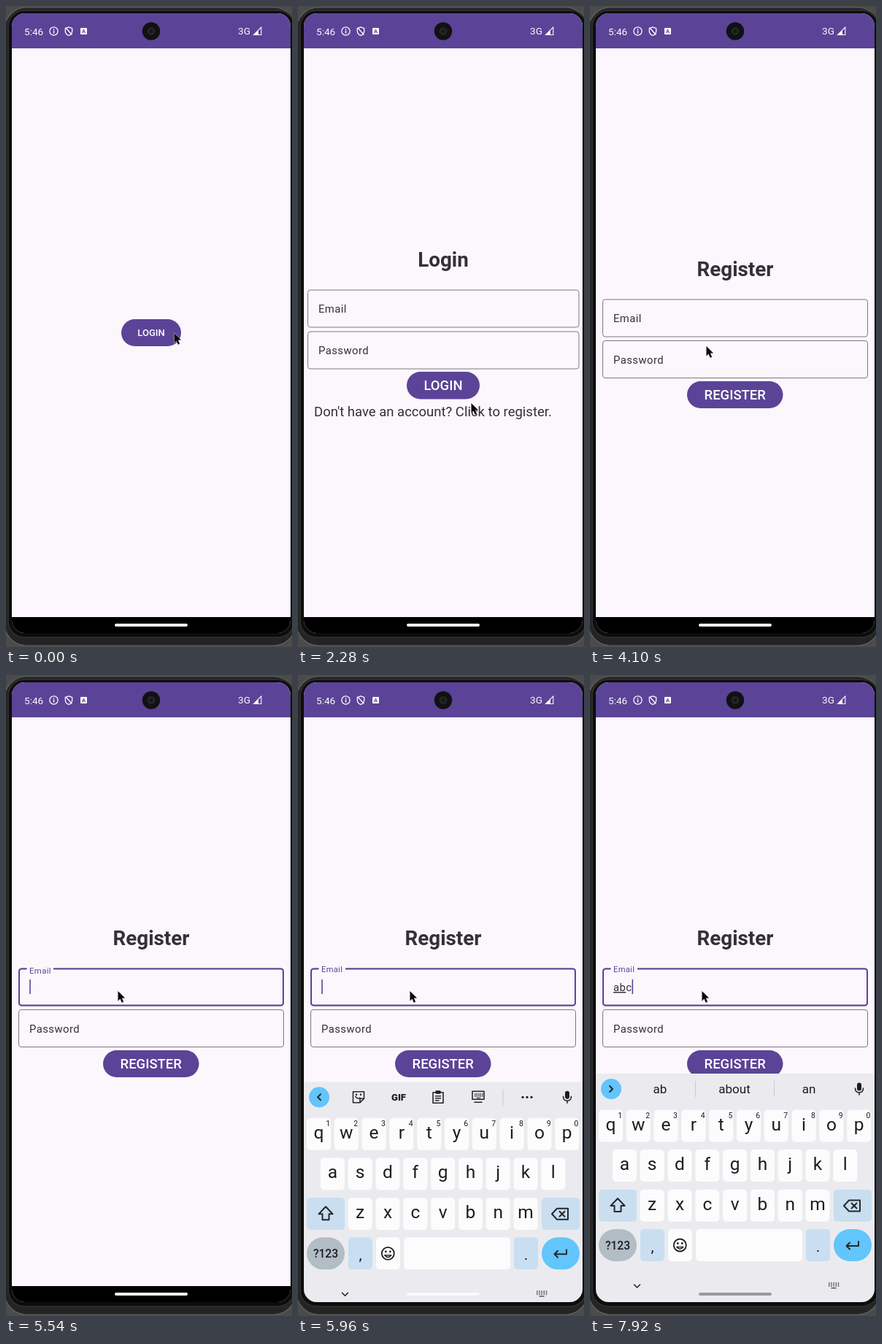
These frames come from a looping animation (392x878 px, 8 s). An HTML page:

```html
<!DOCTYPE html>
<html lang="en">
<head>
<meta charset="utf-8">
<title>Login and register</title>
<style>
  html, body { margin: 0; width: 100%; height: 100%; overflow: hidden; background: #0c0c0c; }
  svg { display: block; width: 100%; height: 100%; font-family: Roboto, sans-serif; }
  .line { fill: none; stroke: #26272b; stroke-width: 1.6; stroke-linejoin: round; stroke-linecap: round; }
</style>
</head>
<body>
<svg id="stage" viewBox="0 0 392 878"></svg>
<script>
const LOOP = 8000;
const PAPER = '#fcf7fc', PURPLE = '#5b4497', INK = '#323139', KEY_INK = '#1c1d20';
const BOARD = '#ebebef', KEY = '#fcfcfd', GREY_KEY = '#c9def1', BLUE = '#62c5fb';
const BOARD_TOP = 546, BOARD_HEIGHT = 313;

const rect = (x, y, w, h, fill, r = 0, extra = '') =>
  `<rect x="${x}" y="${y}" width="${w}" height="${h}" rx="${r}" fill="${fill}" ${extra}/>`;
const circle = (x, y, r, fill, extra = '') =>
  `<circle cx="${x}" cy="${y}" r="${r}" fill="${fill}" ${extra}/>`;
const text = (x, y, size, str, fill = INK, extra = '') =>
  `<text x="${x}" y="${y}" font-size="${size}" fill="${fill}" ${extra}>${str}</text>`;
const line = (d, extra = '') => `<path class="line" d="${d}" ${extra}/>`;
const group = (id, body, extra = '') => `<g id="${id}" ${extra}>${body}</g>`;
const at = (x, y, body) => `<g transform="translate(${x} ${y})">${body}</g>`;
const MID = 'text-anchor="middle"';

const button = (x, y, w, h, size, label) =>
  rect(x, y, w, h, PURPLE, h / 2) +
  text(x + w / 2, y + h / 2 + size * 0.355, size, label, '#fff', MID + ' font-weight="500"');
const title = (y, str) => text(199, y, 27.8, str, INK, MID + ' font-weight="700"');
const box = (x, y, w) => rect(x, y, w, 51, 'none', 3.5, 'stroke="#7c7784"');
const fieldText = (x, y, str) => text(x, y, 14.8, str, INK, 'letter-spacing=".46"');

function statusBar() {
  const white = '#fafafc';
  return rect(8, 10, 382, 48, PURPLE) +
    text(25, 39.5, 13.6, '5:46', white) +
    circle(65.5, 34.5, 5.6, 'none', `stroke="${white}" stroke-width="1.3"`) +
    rect(64.8, 33.6, 1.5, 4, white) + rect(64.8, 31.2, 1.5, 1.5, white) +
    line('M86 28.8L90.7 30.6V34.5Q90.5 38.7 86 40.4Q81.5 38.7 81.3 34.5V30.6ZM82 30L90 39',
      `style="stroke:${white};stroke-width:1.3"`) +
    rect(102, 30, 9, 9, white, 1) +
    text(106.5, 37.2, 7.5, 'A', PURPLE, MID + ' font-weight="700"') +
    circle(199, 34.5, 12.2, '#111113') + circle(199, 34.5, 5.5, '#242427') +
    circle(199, 34.5, 2.2, '#151517') +
    text(318, 39.3, 13.6, '3G', white) +
    `<path d="M339.5 39.5H349.8V29.2Z" fill="none" stroke="${white}" stroke-width="1.1"/>` +
    `<path d="M339 40H346V33Z" fill="${white}"/>`;
}

function letterRow(letters, firstCenter, y, digits) {
  return [...letters].map((letter, i) => {
    const x = firstCenter + 37.8 * i;
    return rect(x - 16.5, y, 33, 44, KEY, 5) +
      text(x, y + 28, 24.5, letter, KEY_INK, MID) +
      (digits ? text(x + 12.8, y + 11.5, 10.5, (i + 1) % 10, KEY_INK, MID) : '');
  }).join('');
}

const miniKeyboard = (w, h) =>
  [0, 1, 2].map(r => [0, 1, 2, 3, 4].map(c =>
    rect(-w / 2 + c * w / 4.4, -h / 2 + r * h / 2.8, 1.5, 1.5, '#4a4b50')).join('')).join('') +
  rect(-w / 4, h / 2 + 1, w / 2, 1.4, '#4a4b50');

function keyboard() {
  const bold = d => line(d, 'style="stroke-width:2"');
  const divider = x => rect(x, 10, 1, 22, '#c8c7d2');
  const mic = rect(-3, -8.5, 6, 11, KEY_INK, 3) + line('M-5.5 -1Q-5.5 5 0 5T5.5 -1M0 5V8');
  const sticker = line('M-7.5 -7.5H7.5V2L2 7.5H-7.5ZM7.5 2H2V7.5M-4 -1Q-2 3 2 1') +
    circle(-3, -3.5, 1.2, KEY_INK) + circle(3, -3.5, 1.2, KEY_INK);
  const clipboard = line('M-7 -6.5H7V8H-7ZM-3.5 -1.5H3.5M-3.5 1.5H3.5M-3.5 4.5H1') +
    rect(-3.5, -9, 7, 4.5, KEY_INK, 1);
  const tools = group('tools', bold('M31 17L27 21L31 25') +
    at(83, 21, sticker) +
    text(138, 25.4, 13, 'GIF', KEY_INK, MID + ' font-weight="900"') +
    at(192, 21, clipboard) +
    at(247, 20, line('M-8 -7H8V4H-8ZM-5 8H5') + at(0.5, -2, miniKeyboard(11, 5))) +
    divider(280.5) + [308, 314, 320].map(x => circle(x, 21, 1.6, KEY_INK)).join(''));
  const words = group('words', bold('M27 17L31 21L27 25') + divider(144) + divider(252) +
    [96, 198, 300].map(x => text(x, 27, 17, '', KEY_INK, MID + ' class="word"')).join(''));

  return rect(8, 0, 382, 340, BOARD) + circle(29, 21, 14, BLUE) + tools + words + at(369, 21, mic) +
    letterRow('qwertyuiop', 28.5, 49.5, true) +
    letterRow('asdfghjkl', 47.4, 104, false) +
    letterRow('zxcvbnm', 85.2, 158.7, false) +
    rect(12, 158.7, 52, 44, GREY_KEY, 5) + rect(334, 158.7, 52, 44, GREY_KEY, 5) +
    bold('M38 171L28.5 181H33.5V189H42.5V181H47.5Z') +
    bold('M355 173.5H370V188.5H355L348 181ZM358.5 177.5L365.5 184.5M365.5 177.5L358.5 184.5') +
    rect(12, 213, 52, 44, '#b2bdc6', 22) + rect(334, 213, 52, 44, BLUE, 22) +
    text(38, 240.5, 15.6, '?123', KEY_INK, MID + ' font-weight="500"') +
    rect(69, 213, 33, 44, GREY_KEY, 5) + text(85.5, 244, 21, ',', KEY_INK, MID) +
    rect(107, 213, 33, 44, KEY, 5) +
    at(123.3, 235, line('M-4.5 2.5Q0 8 4.5 2.5Z') +
      circle(0, 0, 8.5, 'none', `stroke="${KEY_INK}" stroke-width="1.8"`) +
      circle(-3, -2.5, 1.4, KEY_INK) + circle(3, -2.5, 1.4, KEY_INK)) +
    rect(145, 213, 146, 44, KEY, 5) +
    rect(296, 213, 33, 44, GREY_KEY, 5) + text(312.5, 244, 21, '.', KEY_INK, MID) +
    bold('M368 230V236H352M356 231.5L351.5 236L356 240.5') +
    line('M60.5 289L64.5 293L68.5 289') + at(334, 289, miniKeyboard(14, 6));
}

const home = group('home', button(158, 429, 82, 37, 13, 'LOGIN'));

const login = group('login', title(357, 'Login') +
  box(13.5, 389, 371.5) + fieldText(28, 420, 'Email') +
  box(13.5, 446, 371.5) + fieldText(28, 477, 'Password') +
  button(149, 501, 100, 37.5, 18.5, 'LOGIN') +
  text(22, 562, 18.5, "Don't have an account? Click to register."));

const register = group('register', title(370, 'Register') +
  box(17.5, 402, 363) +
  group('focus', rect(18, 402.5, 362, 50, 'none', 3.5, `stroke="${PURPLE}" stroke-width="2"`) +
    rect(28.5, 400, 36.5, 5, PAPER)) +
  group('label', fieldText(0, 0, 'Email')) +
  text(32, 433, 14.8, '<tspan id="settled" text-decoration="underline"></tspan><tspan id="fresh"></tspan>',
    INK, 'id="typed" letter-spacing=".46"') +
  rect(0, 417, 1.6, 20, PURPLE, 0, 'id="caret"') +
  box(17.5, 458.5, 363) + fieldText(32, 489.5, 'Password') +
  button(133, 514, 131.5, 37, 18.5, 'REGISTER'));

document.getElementById('stage').innerHTML =
  '<clipPath id="screen"><rect x="8" y="10" width="382" height="849" rx="18"/></clipPath>' +
  rect(0, 0, 392, 878, '#4b4b4c') +
  rect(-2, 2, 399, 874, '#242425', 30, 'stroke="#606062" stroke-width="1.2"') +
  rect(3, 6, 392, 859, '#0d0d0e', 22, 'stroke="#2c2c2d" stroke-width="2"') +
  `<g clip-path="url(#screen)">` + rect(8, 10, 382, 849, PAPER) + statusBar() +
  home + login + register + rect(8, 837, 382, 22, '#000') +
  group('board', keyboard()) +
  rect(149, 846, 100, 4, '#fafafa', 2, 'id="handle"') + '</g>' +
  group('pointer', '<path d="M0 0V13.4L3 10.5L5.2 15.7L7.6 14.7L5.4 9.6H9.6Z" fill="#080808" ' +
    'stroke="#f5f5f5" stroke-width="1" paint-order="stroke"/>');

const $ = id => document.getElementById(id);
const show = (id, on) => $(id).setAttribute('display', on ? 'inline' : 'none');
const clamp = v => Math.min(1, Math.max(0, v));
const progress = (t, start, length) => clamp((t - start) / length);
const easeOut = p => 1 - (1 - p) ** 3;
const smooth = p => p * p * (3 - 2 * p);
const mix = (a, b, p) => a + (b - a) * p;

// Each move: start, end, destination of the pointer tip.
const moves = [
  [800, 1400, 215.5, 447], [1480, 2200, 237.5, 544],
  [3100, 4060, 159.5, 466], [4100, 4600, 153.5, 433]
];
const LOGIN_OPENS = 640, REGISTER_OPENS = 2640, FOCUS = 5440;
const keystrokes = [[7400, 'a'], [7640, 'b'], [7880, 'c']];
const suggestions = [[7500, ['a', 'and', 'at']], [7740, ['ab', 'about', 'an']]];

function pointerAt(t) {
  let x = 230.5, y = 448;
  for (const [start, end, toX, toY] of moves) {
    const p = smooth(progress(t, start, end - start));
    x = mix(x, toX, p);
    y = mix(y, toY, p);
  }
  return [x, y];
}

function drawField(t) {
  const focused = t >= FOCUS;
  const p = easeOut(progress(t, FOCUS, 175));
  show('focus', focused);
  $('label').setAttribute('transform', `translate(32 ${mix(432.5, 407.2, p)}) scale(${mix(1, 0.75, p)})`);
  $('label').firstChild.setAttribute('fill', focused ? PURPLE : INK);

  const pressed = keystrokes.filter(([time]) => t >= time);
  const letters = keys => keys.map(key => key[1]).join('');
  $('settled').textContent = letters(pressed.filter(([time]) => t >= time + 100));
  $('fresh').textContent = letters(pressed.filter(([time]) => t < time + 100));
  const blinkStart = pressed.length ? pressed.at(-1)[0] : 5500;
  show('caret', focused && (t < blinkStart || (t - blinkStart) % 1000 < 500));
  $('caret').setAttribute('x', pressed.length ? 32 + $('typed').getComputedTextLength() : 32.2);
}

function drawKeyboard(t) {
  const slide = easeOut(progress(t, 5720, 360));
  show('board', slide > 0);
  $('board').setAttribute('transform', `translate(0 ${BOARD_TOP + BOARD_HEIGHT * (1 - slide)})`);
  $('handle').setAttribute('fill', slide < 1 ? '#fafafa' : '#9a9a9c');
  const current = suggestions.filter(([time]) => t >= time).at(-1);
  show('tools', !current);
  show('words', current);
  document.querySelectorAll('.word').forEach((el, i) => { el.textContent = current ? current[1][i] : ''; });
}

function draw(t) {
  show('home', t < LOGIN_OPENS);
  show('login', t >= LOGIN_OPENS && t < REGISTER_OPENS);
  show('register', t >= REGISTER_OPENS);
  drawField(t);
  drawKeyboard(t);
  $('pointer').setAttribute('transform', `translate(${pointerAt(t)})`);
}

const began = performance.now();
function tick() {
  draw((performance.now() - began) % LOOP);
  requestAnimationFrame(tick);
}
tick();
</script>
</body>
</html>
```
